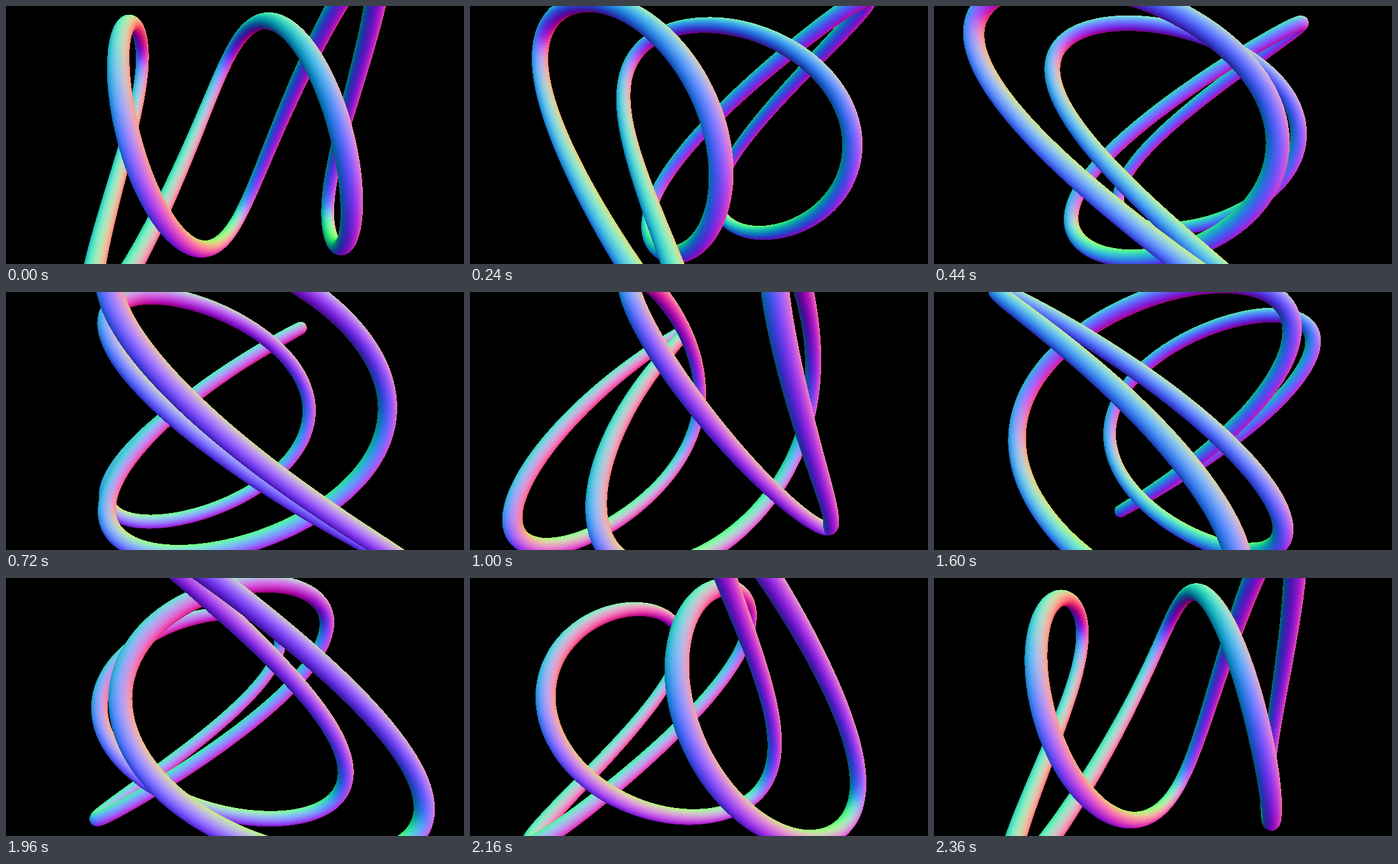
An HTML page with a canvas that plays this animation: 720x405 px, repeating every 2.4 s.

```html
<!DOCTYPE html>
<html lang="en">
<head>
<meta charset="utf-8">
<title>Rotating knot</title>
<style>
html, body { margin: 0; width: 100%; height: 100%; overflow: hidden; background: #000; }
canvas { display: block; width: 720px; height: 405px; }
</style>
</head>
<body>
<canvas id="stage" width="720" height="405"></canvas>
<script>
const W = 720, H = 405;
const LOOP = 2400, STEP = 40;
const FOCAL = 637, DISTANCE = 3.32, RADIUS = 0.0675;
const PHASE_X = -0.658, PHASE_Z = -0.03;
const RINGS = 420, SIDES = 24, ROW = SIDES + 1;

const ctx = document.getElementById('stage').getContext('2d');
const image = ctx.createImageData(W, H);
const pixels = new Uint32Array(image.data.buffer);
const depth = new Float32Array(W * H);
const start = performance.now();

// Lissajous knot with frequencies 1, 3 and 4
const knot = s => [Math.cos(s + PHASE_X), Math.cos(3 * s), Math.cos(4 * s + PHASE_Z)];
const tangent = s => normalize([
  -Math.sin(s + PHASE_X), -3 * Math.sin(3 * s), -4 * Math.sin(4 * s + PHASE_Z)
]);

function normalize(v) {
  const length = Math.hypot(...v);
  return v.map(c => c / length);
}

function cross(a, b) {
  return [a[1] * b[2] - a[2] * b[1], a[2] * b[0] - a[0] * b[2], a[0] * b[1] - a[1] * b[0]];
}

// Tube vertices, with the frame carried along by parallel transport
function buildTube() {
  const vertices = [];
  let normal = [0.3, 0.2, 1];
  for (let i = 0; i <= RINGS; i++) {
    const s = i / RINGS * 2 * Math.PI;
    const centre = knot(s), along = tangent(s);
    const dot = normal.reduce((sum, c, k) => sum + c * along[k], 0);
    normal = normalize(normal.map((c, k) => c - dot * along[k]));
    const side = cross(along, normal);
    for (let j = 0; j <= SIDES; j++) {
      const a = j / SIDES * 2 * Math.PI, ca = Math.cos(a), sa = Math.sin(a);
      const n = normal.map((c, k) => c * ca + side[k] * sa);
      vertices.push({ p: centre.map((c, k) => c + RADIUS * n[k]), n });
    }
  }
  return vertices;
}

const tube = buildTube();
const view = tube.map(() => ({ x: 0, y: 0, w: 0, r: 0, g: 0, b: 0 }));
const channel = n => 127.5 + 127.5 * n;

function project(angle) {
  const c = Math.cos(angle), s = Math.sin(angle);
  tube.forEach(({ p, n }, i) => {
    const v = view[i];
    v.w = 1 / (DISTANCE - p[2] * c + p[0] * s);
    v.x = W / 2 + FOCAL * v.w * (p[0] * c + p[2] * s);
    v.y = H / 2 - FOCAL * v.w * p[1];
    v.r = channel(n[0] * c + n[2] * s);
    v.g = channel(n[1]);
    v.b = channel(n[2] * c - n[0] * s);
  });
}

function triangle(a, b, c) {
  const area = (b.x - a.x) * (c.y - a.y) - (c.x - a.x) * (b.y - a.y);
  if (Math.abs(area) < 1e-6) return;
  const left = Math.max(0, Math.ceil(Math.min(a.x, b.x, c.x) - 0.5));
  const right = Math.min(W - 1, Math.floor(Math.max(a.x, b.x, c.x) - 0.5));
  const top = Math.max(0, Math.ceil(Math.min(a.y, b.y, c.y) - 0.5));
  const bottom = Math.min(H - 1, Math.floor(Math.max(a.y, b.y, c.y) - 0.5));
  for (let y = top; y <= bottom; y++) {
    for (let x = left; x <= right; x++) {
      const px = x + 0.5, py = y + 0.5;
      const kb = ((px - a.x) * (c.y - a.y) - (c.x - a.x) * (py - a.y)) / area;
      const kc = ((b.x - a.x) * (py - a.y) - (px - a.x) * (b.y - a.y)) / area;
      const ka = 1 - kb - kc;
      if (ka < -1e-6 || kb < -1e-6 || kc < -1e-6) continue;
      const w = ka * a.w + kb * b.w + kc * c.w;
      const at = y * W + x;
      if (w <= depth[at]) continue;
      depth[at] = w;
      const red = ka * a.r + kb * b.r + kc * c.r;
      const green = ka * a.g + kb * b.g + kc * c.g;
      const blue = ka * a.b + kb * b.b + kc * c.b;
      pixels[at] = 0xff000000 | blue << 16 | green << 8 | red;
    }
  }
}

function draw(angle) {
  pixels.fill(0xff000000);
  depth.fill(0);
  project(angle);
  for (let i = 0; i < RINGS; i++) {
    for (let j = 0; j < SIDES; j++) {
      const k = i * ROW + j;
      triangle(view[k], view[k + 1], view[k + ROW]);
      triangle(view[k + 1], view[k + ROW + 1], view[k + ROW]);
    }
  }
  ctx.putImageData(image, 0, 0);
}

let shown = -1;
function tick() {
  const step = Math.floor((performance.now() - start) % LOOP / STEP);
  if (step !== shown) {
    shown = step;
    draw(step * STEP / LOOP * 2 * Math.PI);
  }
  requestAnimationFrame(tick);
}
tick();
</script>
</body>
</html>
```
